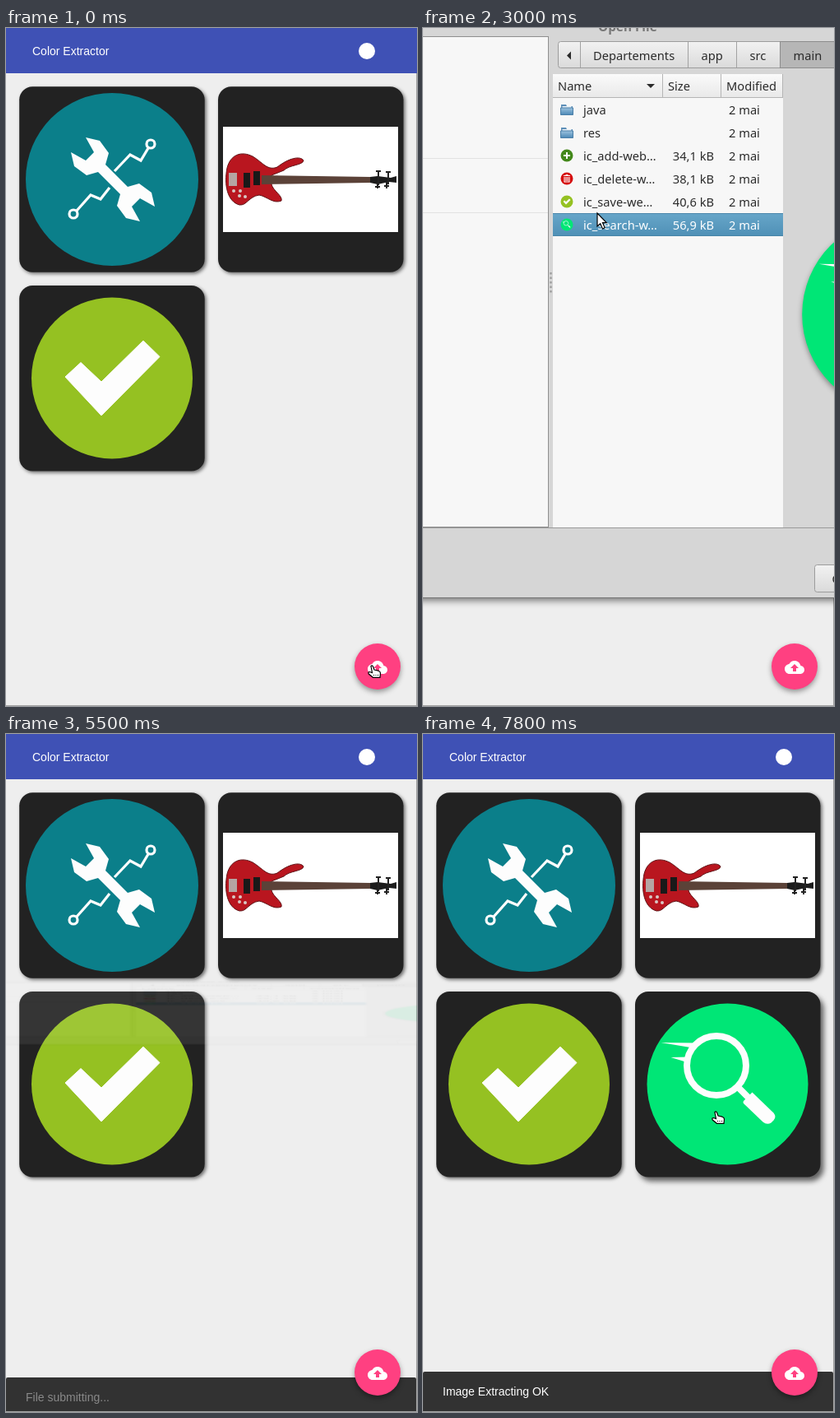
An HTML page for the animation above (8000 ms loop, 500 by 824 pixels).

```html
<!DOCTYPE html>
<html lang="en">
<head>
<meta charset="utf-8">
<title>Color Extractor</title>
<style>
html, body { margin: 0; height: 100%; overflow: hidden; background: #eee; }
svg { display: block; }
.ui { font: 14px "Liberation Sans", Arial, sans-serif; fill: #fff; }
.dlg { font: 14.67px "Noto Sans", sans-serif; fill: #2b2b2b; }
.end { text-anchor: end; }
.inv { fill: #fff; }
.card { filter: drop-shadow(2px 2px 2px rgba(0,0,0,.55)); }
.fab { filter: drop-shadow(0 3px 3px rgba(0,0,0,.38)); }
.panel { filter: drop-shadow(0 3px 4px rgba(0,0,0,.5)); }

.anim { animation: 8s step-end infinite; }
#dialog { animation-name: dialog; transform-origin: 0 338.5px; transform: scaleY(0); opacity: 0; }
#glow { animation-name: glow; opacity: 0; }
#plain { animation-name: plain; }
#columns { animation-name: columns; visibility: hidden; }
#added { animation-name: added; opacity: 0; }
#added rect { animation-name: lift; }
#snack { animation-name: snack; transform: translateY(50px); }
#snack text { opacity: 0; }
#m1 { animation-name: m1; }
#m2 { animation-name: m2; }
#m3 { animation-name: m3; }
#hand { animation-name: hand; transform: translate(440px, 774px); }
#arrow { animation-name: arrow; opacity: 0; }

@keyframes dialog {
  7.5% { transform: scaleY(.28); opacity: .28; }
  8.75% { transform: scaleY(.5616); opacity: .56; }
  10% { transform: scaleY(.8); opacity: .8; }
  11.25% { transform: scaleY(.95); opacity: .95; }
  12.5% { transform: none; opacity: 1; }
  67.5% { transform: scaleY(.5); opacity: .5; }
  68.75% { transform: scaleY(.109); opacity: .09; }
  70% { transform: scaleY(0); opacity: 0; }
}
@keyframes glow { 6.25% { opacity: .07; } 8.75% { opacity: .13; } 18.75% { opacity: 0; } }
@keyframes plain { 37.5% { visibility: hidden; } 100% { visibility: hidden; } }
@keyframes columns { 37.5% { visibility: visible; } 100% { visibility: visible; } }
@keyframes added { 87.5% { opacity: 1; } }
@keyframes lift {
  95% { filter: drop-shadow(2px 3px 2px rgba(0,0,0,.55)); }
  96.25% { filter: drop-shadow(3px 4px 3px rgba(0,0,0,.55)); }
  97.5% { filter: drop-shadow(4px 5px 3px rgba(0,0,0,.6)); }
}
@keyframes snack {
  68.75% { transform: translateY(7px); }
  70% { transform: translateY(1.5px); }
  71.25% { transform: none; }
  73.75% { transform: translateY(2px); }
  75% { transform: translateY(32px); }
  76.25% { transform: translateY(20px); }
  77.5% { transform: translateY(4px); }
  78.75% { transform: none; }
  87.5% { transform: translateY(1px); }
  88.75% { transform: translateY(33px); }
  90% { transform: translateY(45px); }
  91.25% { transform: translateY(50px); }
  95% { transform: translateY(7px); }
  96.25% { transform: translateY(1px); }
  97.5% { transform: none; }
}
@keyframes m1 { 68.75% { opacity: .42; } 70% { opacity: .8; } 71.25% { opacity: 1; } 75% { opacity: .5; } 76.25% { opacity: 0; } }
@keyframes m2 { 76.25% { opacity: .2; } 77.5% { opacity: .7; } 78.75% { opacity: 1; } 88.75% { opacity: .4; } 90% { opacity: .1; } 91.25% { opacity: 0; } }
@keyframes m3 { 95% { opacity: .42; } 96.25% { opacity: .85; } 97.5% { opacity: 1; } }
@keyframes hand {
  18.75% { opacity: 0; }
  95% { opacity: 1; transform: translate(351px, 458px); }
}
@keyframes arrow {
  18.75% { opacity: 1; transform: translate(212px, 302px); }
  22.5% { transform: translate(224px, 268px); opacity: 1; }
  23.75% { transform: translate(218px, 232px); opacity: 1; }
  25% { transform: translate(212px, 207px); opacity: 1; }
  26.25% { transform: translate(212px, 202px); opacity: 1; }
  27.5% { transform: translate(214px, 199px); opacity: 1; }
  28.75% { transform: translate(216px, 197px); opacity: 1; }
  32.5% { transform: translate(215px, 206px); opacity: 1; }
  33.75% { transform: translate(213px, 217px); opacity: 1; }
  35% { transform: translate(212px, 225px); opacity: 1; }
  42.5% { transform: translate(320px, 380px); opacity: 1; }
  43.75% { transform: translate(406px, 489px); opacity: 1; }
  47.5% { transform: translate(298px, 339px); opacity: 1; }
  48.75% { transform: translate(403px, 360px); opacity: 1; }
  52.5% { transform: translate(340px, 310px); opacity: 1; }
  53.75% { transform: translate(276px, 259px); opacity: 1; }
  55% { opacity: 0; }
}
</style>
</head>
<body>
<svg width="500" height="824" viewBox="0 0 500 824">
  <defs>
    <linearGradient id="sel" x2="0" y2="1"><stop stop-color="#67a6c9"/><stop offset="1" stop-color="#4f90b6"/></linearGradient>
    <linearGradient id="btn" x2="0" y2="1"><stop stop-color="#f2f2f2"/><stop offset="1" stop-color="#dadada"/></linearGradient>
    <linearGradient id="head" x2="0" y2="1"><stop stop-color="#fafafa"/><stop offset="1" stop-color="#e9e9e9"/></linearGradient>
    <linearGradient id="fold" x2="0" y2="1"><stop stop-color="#9cc3df"/><stop offset="1" stop-color="#4c88b5"/></linearGradient>
    <rect id="card" class="card" width="225.5" height="225.5" rx="16" fill="#222"/>
    <g id="check">
      <circle r="98" fill="#95c122"/>
      <path d="M-57-1.5-38-19-13 4.5 38-45.500 58-26-13 45.500Z" fill="#fdfdfd" stroke="#fdfdfd" stroke-linejoin="round"/>
    </g>
    <g id="search">
      <circle r="98" fill="#00e676"/>
      <g fill="#fdfdfd">
        <circle cx="-13.500" cy="-22.500" r="36" fill="none" stroke="#fdfdfd" stroke-width="8"/>
        <path d="M-81-50.500-36-50-42-44ZM-69-32.500-48-33-51-27Z"/>
        <path d="M12 3 25 16" stroke="#fdfdfd" stroke-width="8"/>
        <path d="M20 20 30 10 56 35Q60 40 56 44L53 47Q48 50 43 46L20 24Q18 22 20 20Z"/>
      </g>
    </g>
    <g id="folder">
      <path d="M1 2h6l1 2h7v3H1z" fill="#5d8fb8"/>
      <path d="M2.500 4h11v4h-11z" fill="#e9f1f7"/>
      <path d="M.5 6h15v8.500H.5z" fill="url(#fold)" stroke="#4a7fa8"/>
    </g>
    <g id="add"><circle r="7.500" fill="#43881a"/><path d="M-4 0h8M0-4v8" stroke="#fff" stroke-width="2"/></g>
    <g id="trash"><circle r="7.500" fill="#d50b0b"/><path d="M-4-3.500h8M-1.500-4.500h3M-3-2v6h6v-6M-1-2v5M1-2v5" fill="none" stroke="#fff" stroke-width="1.100"/></g>
    <g id="tick"><use href="#check" transform="scale(.0765)"/></g>
    <g id="lens"><use href="#search" transform="scale(.0765)"/></g>
  </defs>

  <rect width="500" height="824" fill="#eee"/>
  <rect width="500" height="55" fill="#3f51b5"/>
  <text class="ui" x="32" y="33">Color Extractor</text>
  <circle cx="439" cy="28" r="10" fill="#fff"/>

  <use href="#card" x="16.200" y="71.200"/>
  <g transform="translate(129 184)">
    <circle r="105" fill="#0b7f8a"/>
    <g fill="none" stroke="#fdfdfd" stroke-width="3.200">
      <circle cx="47" cy="-43" r="5"/>
      <circle cx="-47" cy="42" r="5"/>
      <path d="M44-38 35-23 22-30 3-10M-43 38-26 19-14 24-3 10"/>
    </g>
    <path transform="translate(1 0)" fill="#fdfdfd" d="M-33-51-16-47-5-32-9-18 18 9 32 5 47 16 51 33 33 23 23 33 33 51 16 47 5 32 9 18-18-9-32-5-47-16-51-33-33-23-23-33Z"/>
  </g>

  <use href="#card" x="258" y="71.200"/>
  <rect x="264" y="120" width="213" height="128" fill="#fff"/>
  <path d="M269 170C273 154 286 149 300 156 312 163 318 174 330 169 344 158 358 155 362 161 361 167 345 166 338 173L323 179V190C325 198 337 204 335 210 325 214 318 205 308 203 295 205 293 216 284 215 269 211 265 190 269 170Z" fill="#b9161f" stroke="#5e1114"/>
  <path d="M311 179 443 181V188L311 190Z" fill="#5b4238"/>
  <path d="M443 181 452 180 468 182 475 180V188L466 187 452 190 443 188Z" fill="#1c1c1c"/>
  <path d="M453 173v18M465 174v16M450 174h6M462 175h6M449 193h6M460 192h6M452 188v7M463 187v8" stroke="#222" stroke-width="2"/>
  <path d="M289 176h8v18h-8zM301 174h8v17h-8z" fill="#191919"/>
  <path d="M271 176h10v16h-10z" fill="#b5a5a3"/>
  <g fill="#d8c8c4"><circle cx="277" cy="198" r="2"/><circle cx="284" cy="204" r="2"/><circle cx="285" cy="198" r="2"/><circle cx="291" cy="205" r="2"/></g>

  <use href="#card" x="16.200" y="313"/>
  <use href="#check" x="129" y="425.500"/>

  <g id="added" class="anim">
    <rect class="card anim" x="258" y="313" width="225.500" height="225.500" rx="16" fill="#222"/>
    <use href="#search" x="370.500" y="425.500"/>
  </g>

  <g id="snack" class="anim">
    <rect y="775" width="499" height="50" rx="2" fill="#323232"/>
    <g class="ui">
      <text id="m1" class="anim" x="24" y="804">File submitting...</text>
      <text id="m2" class="anim" x="24" y="804">Image Extracting...</text>
      <text id="m3" class="anim" x="24" y="804">Image Extracting OK</text>
    </g>
  </g>
  <path d="M499.500 55V824M0 823.500H500" stroke="#a2a2a2"/>

  <circle class="fab" cx="452" cy="776" r="28" fill="#ff4081"/>
  <circle id="glow" class="anim" cx="452" cy="776" r="28" fill="#fff"/>
  <path transform="translate(440 765)" fill="#fff" d="M19.350 10.040C18.670 6.590 15.640 4 12 4 9.110 4 6.600 5.640 5.350 8.040 2.340 8.360 0 10.910 0 14c0 3.310 2.690 6 6 6h13c2.760 0 5-2.240 5-5 0-2.640-2.050-4.780-4.650-4.960zM14 13v4h-4v-4H7l5-5 5 5h-3z"/>

  <g id="dialog" class="dlg anim">
    <rect class="panel" x="-40" y="-15" width="600" height="707.500" fill="#d6d6d6" stroke="#777"/>
    <text x="213" y="4" font-size="15.300" font-weight="700" fill="#777">Open File</text>
    <rect x="-5" y="10.500" width="157.500" height="596" fill="#f7f7f7" stroke="#8f8f8f"/>
    <path d="M0 158.500H152M0 224.500H152" stroke="#e2e2e2"/>
    <path d="M155.500 297V322" stroke="#a0a0a0" stroke-width="2.500" stroke-dasharray="2.500 3"/>
    <path d="M0 607.500H500" stroke="#9a9a9a"/>
    <rect x="164.500" y="16.500" width="360" height="32" rx="3" fill="url(#btn)" stroke="#9c9c9c"/>
    <rect x="434.500" y="16.500" width="90" height="32" fill="#b6b6b6" stroke="#8d8d8d"/>
    <path d="M191.500 17V48M322.500 17V48M381.500 17V48" stroke="#a2a2a2"/>
    <path d="M180 28.500V38.500L175 33.500Z"/>
    <text x="207" y="39">Departements</text><text x="338.500" y="39">app</text>
    <text x="397.500" y="39">src</text><text x="450.500" y="39">main</text>
    <rect x="476.500" y="652.500" width="90" height="33" rx="3" fill="url(#btn)" stroke="#9c9c9c"/>
    <text x="497.500" y="675">Open</text>
    <g id="plain" class="anim"></g>
    <g id="columns" class="anim"></g>
  </g>

  <g id="arrow" class="anim">
    <path d="M0 0V16L3.700 12.700 6.500 19 9.200 17.800 6.500 11.700H11.300Z" fill="#fff" stroke="#000" stroke-width="1.200"/>
  </g>
  <g id="hand" class="anim">
    <path d="M4 1.500Q5.500 0 6.500 2L8 6 13 7.200Q15.500 8 15.500 10L15 15.300H6.500L1.200 11Q0 8.500 2.500 8.500L5.500 9.500Z" fill="#fff" stroke="#000" stroke-width="1.200"/>
    <path d="M7 12.500H14" stroke="#000" stroke-dasharray="1 1.500"/>
  </g>
</svg>
<script>
const files = [
  ["folder", "java", "java"],
  ["folder", "res", "res"],
  ["add", "ic_add-web.png", "ic_add-web…", "34,1 kB"],
  ["trash", "ic_delete-web.png", "ic_delete-w…", "38,1 kB"],
  ["tick", "ic_save-web.png", "ic_save-we…", "40,6 kB"],
  ["lens", "ic_search-web.png", "ic_search-w…", "56,9 kB"]
];
const text = (x, y, s, cls = "") => `<text x="${x}" y="${y}" class="${cls}">${s}</text>`;
const rect = (y, w, h, fill) => `<rect x="158" y="${y}" width="${w}" height="${h}" fill="${fill}"/>`;

function list(width, selected, wide) {
  let out = rect(56, width, 551, "#f7f7f7") + rect(56, width, 28, "url(#head)") +
    rect(84, width, 1, "#b5b5b5") + text(164, 76, "Name");
  files.forEach(([icon, name, short, size], i) => {
    const y = 85 + 28 * i, on = i === selected, cls = on ? "inv" : "";
    if (on) out += rect(y, width, 28, "url(#sel)") + rect(y, width, 1, "#4c88ac") + rect(y + 27, width, 1, "#4785a8");
    out += icon === "folder"
      ? `<use href="#folder" x="167" y="${y + 6}"/>`
      : `<use href="#${icon}" x="175" y="${y + 14}"/>`;
    out += text(195, y + 20, wide ? name : short, cls);
    if (wide) return;
    if (size) out += text(354, y + 20, size, cls + " end");
    out += text(372, y + 20, "2 mai", cls);
  });
  return out;
}

document.getElementById("plain").innerHTML = list(342, 0, true);
document.getElementById("columns").innerHTML = list(280, 5, false) +
  '<path d="M291.5 56V84M362.5 56V84M437.5 56V84" stroke="#b5b5b5"/><path d="M272 68H282L277 73Z"/>' +
  text(298, 76, "Size") + text(369, 76, "Modified") +
  '<g class="fab"><use href="#search" transform="translate(580 348) scale(1.212)"/></g>';
</script>
</body>
</html>
```
